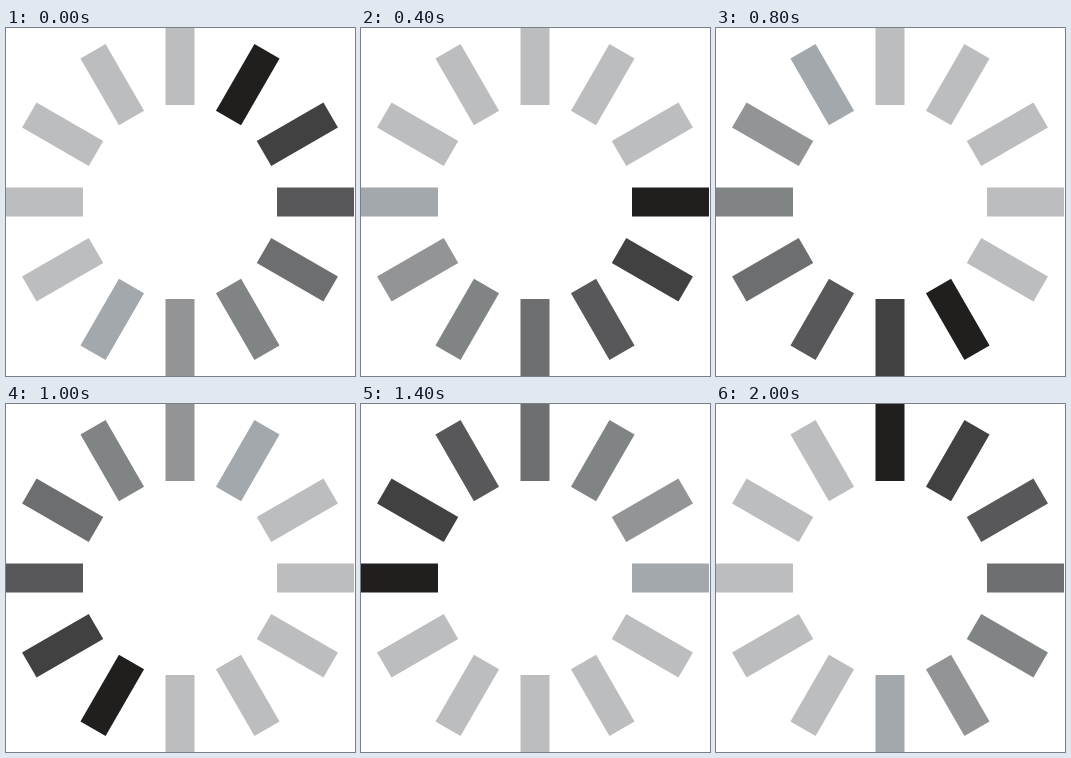
Recreate the animation shown at these times as an HTML page with a canvas. Size 349 px wide and 348 px high, loop 2200 ms.

```html
<!DOCTYPE html>
<html lang="en">
<head>
<meta charset="utf-8">
<title>Spinner</title>
<style>
  html, body { margin: 0; width: 100%; height: 100%; overflow: hidden; background: #fff; }
  canvas { display: block; }
</style>
</head>
<body>
<canvas id="stage" width="349" height="348"></canvas>
<script>
const ctx = document.getElementById('stage').getContext('2d');
const BARS = 12;
const STEP = 200;
const CENTER = 174, INNER = 97, OUTER = 174, WIDTH = 29;
const SHADES = ['#211f1e', '#414142', '#58585a', '#6d6e70', '#808484', '#929496', '#a2a8ab'];
const REST = '#bcbdbf';

// Positions of the darkest bar, clockwise from the top; the bottom one is skipped.
const HEADS = [1, 2, 3, 4, 5, 7, 8, 9, 10, 11, 0];

function drawBar(index, color) {
  ctx.save();
  ctx.translate(CENTER, CENTER);
  ctx.rotate(index * 2 * Math.PI / BARS);
  ctx.fillStyle = color;
  ctx.fillRect(-WIDTH / 2, -OUTER, WIDTH, OUTER - INNER);
  ctx.restore();
}

function draw(time) {
  const head = HEADS[Math.floor(time / STEP) % HEADS.length];
  ctx.fillStyle = '#fff';
  ctx.fillRect(0, 0, 349, 348);
  for (let i = 0; i < BARS; i++) {
    drawBar(head + i, SHADES[i] || REST);
  }
}

let start = null;
function tick(now) {
  if (start === null) start = now;
  draw(Math.max(0, now - start));
  requestAnimationFrame(tick);
}
draw(0);
requestAnimationFrame(tick);
</script>
</body>
</html>
```
